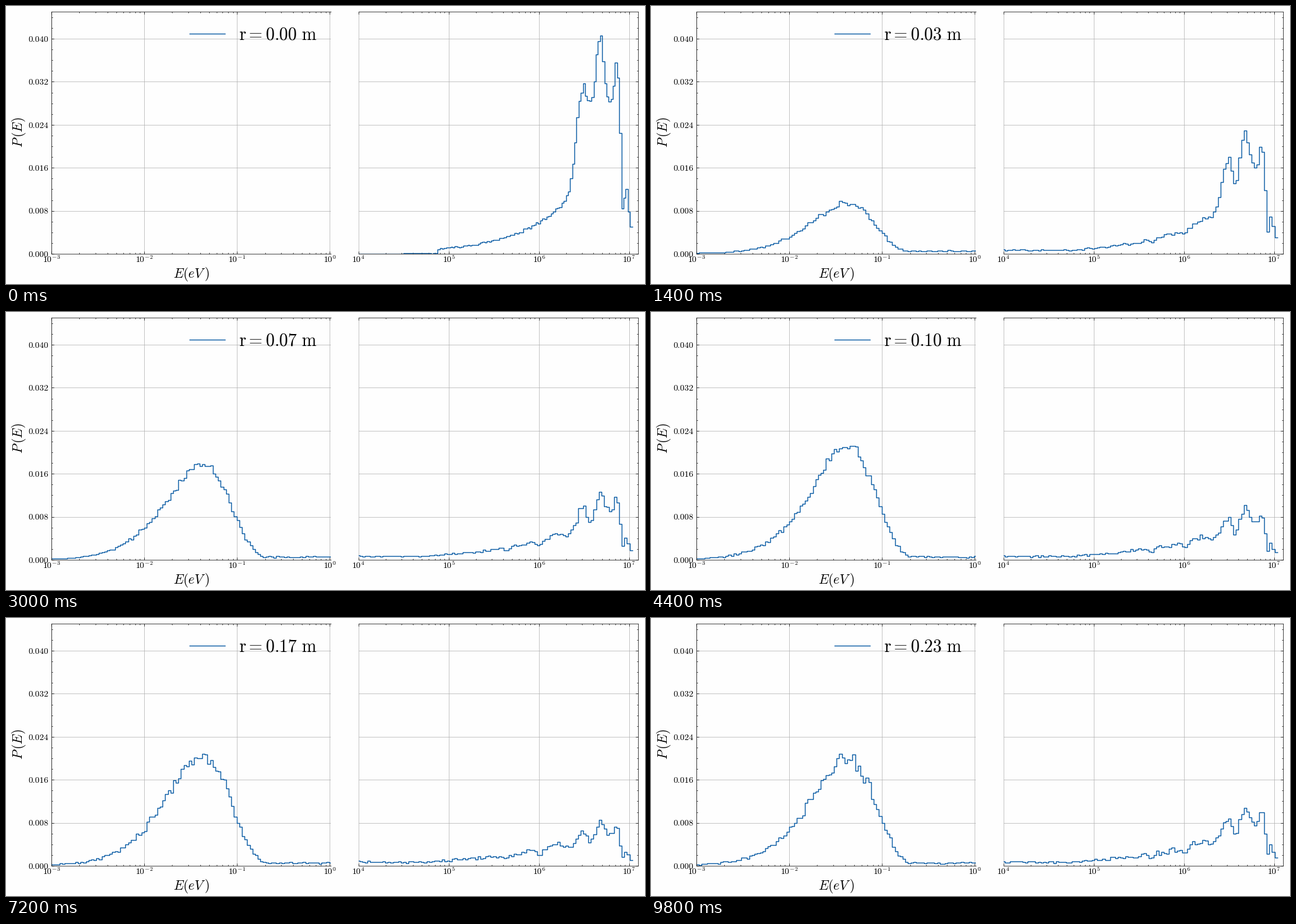
Animation, 1013 px wide and 442 px high, one loop 10000 ms. Source, as a matplotlib script:

```python
import numpy as np
import matplotlib.pyplot as plt
from matplotlib.animation import FuncAnimation
from matplotlib.lines import Line2D
from matplotlib.ticker import AutoMinorLocator, MultipleLocator

W, H, DPI = 1013, 442, 100
FRAMES, INTERVAL = 50, 200
BLUE = "#0C5DA5"
TOP = 7.032                    # log10 of the highest energy
STEP, STEP0 = 0.0285, 0.0237   # bin widths in decades, later and at r = 0
UNIT = 1e-4

# u is log10(E); spectrum heights are in units of 1e-4
LINES = [(6.495, 0.018, 30), (6.675, 0.035, 122), (6.858, 0.02, 80),
         (6.967, 0.02, 80)]    # centre, width, height
DIPS = [5.64, 6.01, 6.57]      # absorption resonances

plt.rcParams.update({"mathtext.fontset": "cm", "axes.linewidth": 0.5})
fig = plt.figure(figsize=(W / DPI, H / DPI), dpi=DPI, facecolor="#fefefe")


def sigmoid(x):
    return 1 / (1 + np.exp(-np.clip(x, -50, 50)))


def bell(u, centre, width):
    return np.exp(-((u - centre) / width) ** 2 / 2)


def source(u):
    """Fast spectrum at the origin: power law, plateau, lines and cut-off."""
    rise = 9 * 10 ** (0.74 * (u - 4.9)) + 200 * sigmoid((u - 6.41) / 0.03)
    plateau = np.clip(rise, 7, 285) + sum(
        h * bell(u, c, w) for c, w, h in LINES[:3])
    cut = 0.17 + 0.83 * sigmoid((6.909 - u) / 0.008)
    c, w, h = LINES[3]
    return plateau * cut + h * bell(u, c, w)


def fast(u, i):
    if i == 0:
        return np.where(u > 4.875, source(u), np.where(u > 4.5, 1, 0))
    decay = 0.2 + np.exp(-i / 7) + 0.08 * max((i - 36) / 13, 0) ** 2
    # low energies hardly fade, the peaks fade fully
    power = np.interp(u, [5, 6, 6.2, 6.42], [0, 0.45, 0.45, 1])
    depth = 0.3 * (1 - np.exp(-i / 7))
    dips = 1 - depth * sum(bell(u, c, 0.025) for c in DIPS)
    return source(u) * decay ** power * dips


def thermal(u, i):
    """Maxwell-like peak that grows with r, above a flat tail."""
    amp = np.sin(np.pi / 2 * min(i / 24, 1)) - 0.0024 * max(i - 24, 0)
    x = 10 ** (u + 1.38)
    peak = 213 * amp * (x * np.exp(1 - x)) ** 1.65
    return np.maximum(peak, np.where(u > -1, 5.5, 2))


def stairs(model, low, high, i):
    step = STEP if i else STEP0
    edges = TOP - step * np.arange(int((TOP - low) / step) + 2)[::-1]
    edges = edges[edges < high + step]
    h = model((edges[:-1] + edges[1:]) / 2, i) * UNIT
    rng = np.random.default_rng(100 + i)
    spread = (0.0025 + 0.00005 * i) * np.sqrt(h)
    h = np.maximum(h + spread * rng.normal(size=h.size).clip(-2, 2), 0)
    return 10 ** edges, np.r_[h, h[-1]]


# ---------- stage ----------
def text(x, y, s, size, **kw):
    return fig.text(x / W, 1 - y / H, s, fontsize=size, color="black", **kw)


def panel(x0, x1, low, high, side):
    y0, y1 = 9.3, 394
    ax = fig.add_axes([x0 / W, 1 - y1 / H, (x1 - x0) / W, (y1 - y0) / H],
                      facecolor="none")
    ax.set_xscale("log")
    ax.set_xlim(10 ** low, 10 ** high)
    ax.set_ylim(0, 0.045)
    ax.yaxis.set_major_locator(MultipleLocator(0.008))
    ax.yaxis.set_minor_locator(AutoMinorLocator(4))
    ax.grid(True, color="#b0b0b0", lw=0.5)
    for which, size in (("major", 3), ("minor", 1.5)):
        ax.tick_params(which=which, direction="in", length=size, width=0.5,
                       top=True, left=side == "left", right=side == "right",
                       labelleft=False, labelbottom=False)
    ax.spines["right" if side == "left" else "left"].set_visible(False)
    for n in range(int(low), int(high) + 1):
        x = x0 + (x1 - x0) * (n - low) / (high - low)
        text(x, 408.4, f"$10^{{{n}}}$", 10, ha="center", va="baseline")
    line, = ax.plot([], [], color=BLUE, lw=1, drawstyle="steps-post")
    return line


slow_line = panel(72, 515.1, -3, 0.0115, "left")
fast_line = panel(559, 1002.3, 4, 7.1, "right")

for k in range(6):
    text(68, 398.7 - 68.4 * k, f"${0.008 * k:.3f}$", 10,
         ha="right", va="baseline")
text(293.5, 432.5, r"$E(eV\,)$", 15.3, ha="center", va="baseline")
text(20, 201, r"$P\,(E)$", 15.3, ha="center", va="center", rotation=90)

fig.add_artist(Line2D([291 / W, 347 / W], [1 - 44 / H] * 2, color=BLUE, lw=1))
radius = text(369, 53, "", 20, ha="left", va="baseline")


def update(i):
    slow_line.set_data(*stairs(thermal, -3.1, 0.05, i))
    slow_line.set_visible(i > 0)
    fast_line.set_data(*stairs(fast, 3.9, TOP, i))
    radius.set_text(rf"$\mathrm{{r={0.0046 * i:.2f}\ m}}$")
    return slow_line, fast_line, radius


anim = FuncAnimation(fig, update, frames=FRAMES, interval=INTERVAL,
                     init_func=lambda: update(0), repeat=True, repeat_delay=0)
plt.show()
```
